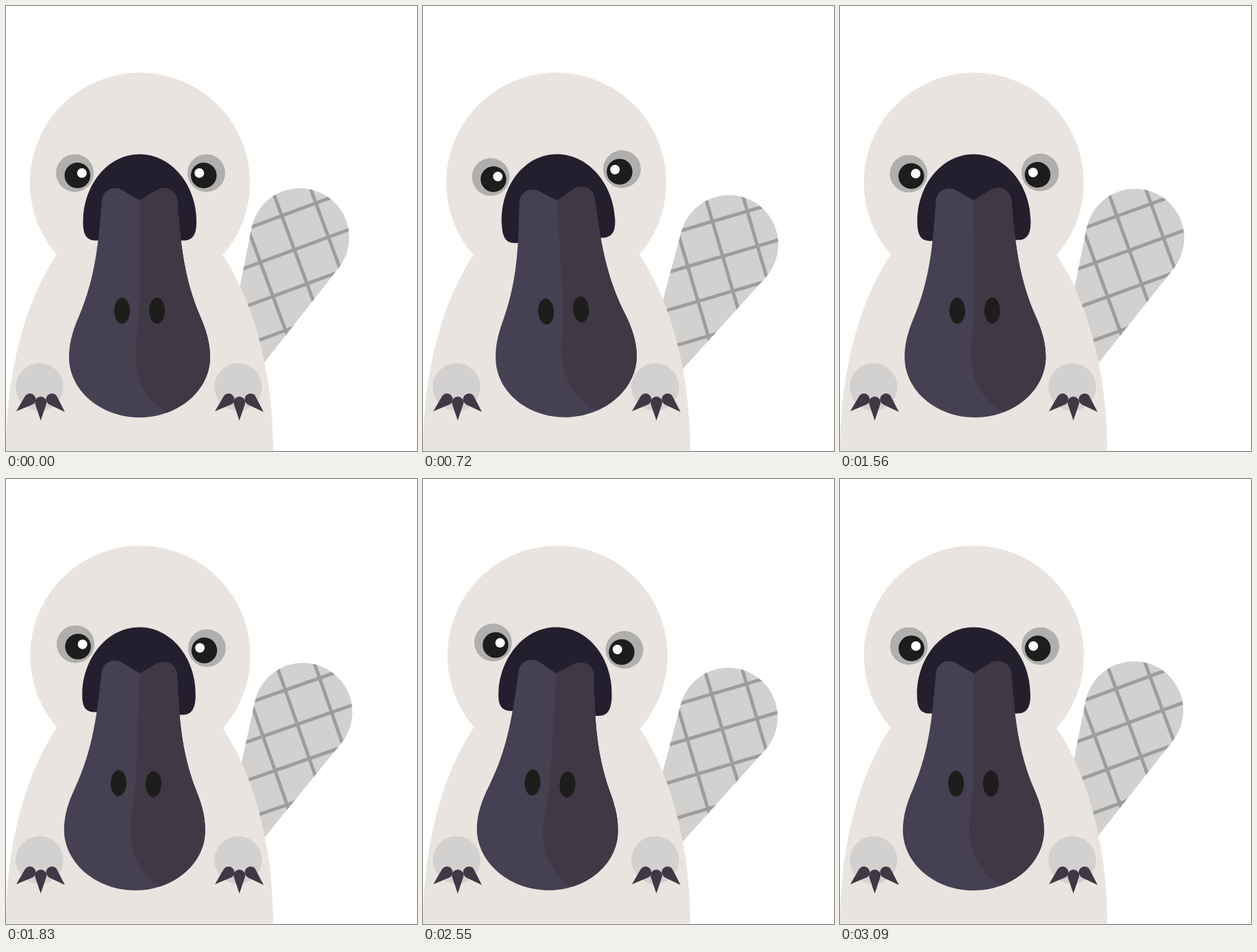
An HTML page with a canvas for the animation above (3120 ms loop, 600 by 650 pixels).

```html
<!DOCTYPE html>
<html lang="en">
<head>
<meta charset="utf-8">
<title>Platypus</title>
<style>
html, body { margin: 0; width: 100%; height: 100%; overflow: hidden; background: #fff; }
canvas { display: block; }
</style>
</head>
<body>
<canvas id="stage" width="600" height="650"></canvas>
<script>
const ctx = document.getElementById('stage').getContext('2d');
const LOOP = 3120, STEP = 30;
const CREAM = '#e9e4e0', GREY = '#d2d1cf', MESH = '#9d9d9d', RING = '#b0afae';
const BLACK = '#1d1d1b', NIGHT = '#241f2e', SLATE = '#454052', PLUM = '#403845';

// time in ms -> progress of the sway
const PACE = [
  [0, 0], [720, 0.226], [1200, 0.374], [1560, 0.481], [2070, 0.626],
  [2160, 0.651], [2550, 0.786], [2700, 0.838], [3095, 1], [3120, 1]
];

const tailShape = new Path2D(
  'M310 570 L358.3 324.5 A72 72 0 1 1 485.3 383 L340 568 Z');
const brow = new Path2D(
  'M195 216.5 C148 216.5 112.5 262 112.5 315 C112.5 332 116 342.5 131 342.5 ' +
  'L259 342.5 C274 342.5 278 332 278 315 C278 262 242 216.5 195 216.5 Z');
const bill = new Path2D(
  'M195 284 L170 269 C158 262 142 268 140 283 C135 345 131 395 107 452 ' +
  'C96 477 92 495 92 513 C92 561 138 601 195 601 C252 601 298 561 298 513 ' +
  'C298 495 294 477 283 452 C259 395 255 345 250 283 C248 268 232 262 220 269 Z');
const shade = new Path2D(
  'M195 284 L195 425 C195 470 189 480 189 515 C189 550 210 582 239 596 ' +
  'L320 620 L320 250 L195 250 Z');

function lerpTable(table, x) {
  let i = 1;
  while (i < table.length - 1 && x > table[i][0]) i++;
  const [x0, y0] = table[i - 1], [x1, y1] = table[i];
  return y0 + (y1 - y0) * (x - x0) / (x1 - x0);
}

function ellipse(x, y, rx, ry, color) {
  ctx.fillStyle = color;
  ctx.beginPath();
  ctx.ellipse(x, y, rx, ry, 0, 0, Math.PI * 2);
  ctx.fill();
}

const circle = (x, y, r, color) => ellipse(x, y, r, r, color);

function fill(path, color) {
  ctx.fillStyle = color;
  ctx.fill(path);
}

function turned(x, y, degrees, draw) {
  ctx.save();
  ctx.translate(x, y);
  ctx.rotate(degrees * Math.PI / 180);
  ctx.translate(-x, -y);
  draw();
  ctx.restore();
}

function tail() {
  fill(tailShape, GREY);
  ctx.clip(tailShape);
  ctx.translate(421, 356);
  ctx.rotate(-20.3 * Math.PI / 180);
  ctx.strokeStyle = MESH;
  ctx.lineWidth = 5;
  ctx.beginPath();
  for (let i = -2; i <= 3; i++) {
    const d = i * 53;
    ctx.moveTo(-250, d);
    ctx.lineTo(250, d);
    ctx.moveTo(d, -250);
    ctx.lineTo(d, 250);
  }
  ctx.stroke();
}

function body() {
  ctx.fillStyle = CREAM;
  ctx.beginPath();
  ctx.ellipse(195, 649.5, 195, 365, 0, Math.PI, Math.PI * 2);
  ctx.fill();
}

function claw(x, y, tipX, tipY) {
  const r = 8.5, dx = tipX - x, dy = tipY - y;
  const a = Math.atan2(dy, dx), spread = Math.acos(r / Math.hypot(dx, dy));
  ctx.fillStyle = PLUM;
  ctx.beginPath();
  ctx.moveTo(tipX, tipY);
  ctx.arc(x, y, r, a + spread, a - spread + Math.PI * 2);
  ctx.fill();
}

function paw(x) {
  circle(x, 556.5, 34.8, GREY);
  claw(x - 14, 574.5, x - 34, 592);
  claw(x + 18, 574.5, x + 37, 593);
  claw(x + 1.7, 579, x + 1.7, 605.5);
}

function eye(x, side) {
  circle(x, 244, 27.5, RING);
  circle(x + side * 3.8, 247.5, 18.8, BLACK);
  circle(x + side * 10.3, 244, 7, '#fff');
}

function head() {
  circle(195.5, 258, 160.7, CREAM);
  eye(100.5, 1);
  eye(292.5, -1);
  fill(brow, NIGHT);
  fill(bill, SLATE);
  ctx.save();
  ctx.clip(bill);
  fill(shade, PLUM);
  ctx.restore();
  ellipse(169.5, 445, 11.5, 19, BLACK);
  ellipse(220.5, 445, 11.5, 19, BLACK);
}

// 0 -> 1 -> -1 -> 0 over thirds
function tilt(p) {
  const q = p * 3;
  return q < 1 ? q : q < 2 ? 3 - 2 * q : q - 3;
}

// two rises and falls per loop
const wag = p => 1 - Math.abs(1 - (p * 4) % 2);

function draw(ms) {
  const t = Math.floor((ms % LOOP) / STEP) * STEP;
  const p = lerpTable(PACE, t);
  ctx.fillStyle = '#fff';
  ctx.fillRect(0, 0, 600, 650);
  turned(292, 598, 4.4 * wag(p), tail);
  body();
  paw(49);
  paw(339);
  turned(195, 274, -5 * tilt(p), head);
}

let start = null;
function tick(now) {
  if (start === null) start = now;
  draw(now - start);
  requestAnimationFrame(tick);
}
draw(0);
requestAnimationFrame(tick);
</script>
</body>
</html>
```
